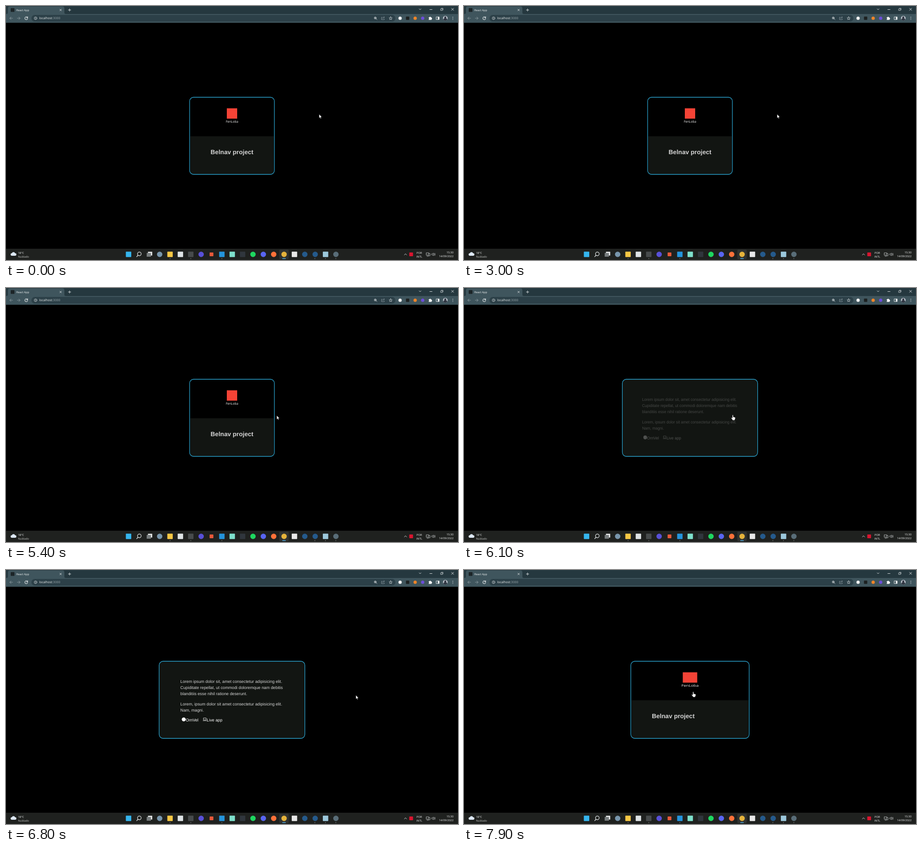
Animation, 960 px wide and 540 px high, one loop 8000 ms. Source, as an HTML page:

```html
<!DOCTYPE html>
<html lang="en">
<head>
<meta charset="utf-8">
<title>Expanding card</title>
<style>
  html, body { margin: 0; width: 100%; height: 100%; overflow: hidden; background: #000; }
  svg { display: block; width: 960px; height: 540px; }
  text { text-rendering: geometricPrecision; white-space: pre; }
  .ui { font-family: "Open Sans", "Noto Sans", sans-serif; font-size: 5.8px; fill: #f0f2f2; }
  .page { font-family: "Liberation Sans", Arial, sans-serif; font-size: 8.8px; fill: #d8d8d8; }
  .line { fill: none; stroke: #e6eaeb; stroke-width: .9; stroke-linecap: round; stroke-linejoin: round; }
  .dim { stroke: #8d9ba1; }
</style>
</head>
<body>
<svg viewBox="0 0 960 540">
  <defs>
    <clipPath id="cardClip"><rect class="cardBox" y="194" height="164" rx="8.5"/></clipPath>
  </defs>
  <rect width="960" height="540"/>

  <!-- Browser -->
  <g class="ui">
    <rect width="960" height="35.5" fill="#25383f"/>
    <rect y="17" width="960" height="18.5" fill="#3f555d"/>
    <path d="M1 17Q4 17 4 14V5Q4 1 8 1H120Q124 1 124 5V14Q124 17 127 17Z" fill="#3f555d"/>
    <rect x="54" y="19" width="773" height="14" rx="7" fill="#2c4048"/>
    <rect x="10" y="4.5" width="8" height="8" rx="1" fill="#1c2427"/>
    <text x="22" y="10.7">React App</text>
    <text x="70.5" y="28.4" font-size="6.65">localhost<tspan fill="#9aa7ac">:3000</tspan></text>
    <path d="M897.8 24h1.8a1.2 1.2 0 0 1 2.4 0h1.8v1.7a1.2 1.2 0 0 1 0 2.4v1.5h-6v-1.7a1 1 0 0 0 0-2.1z" fill="#fff"/>
    <path d="M917.2 23h3v6h-3z" fill="#fff"/>
    <circle cx="933" cy="26" r="5" fill="#bfc6cf"/>
    <path d="M929 29q0-2.6 2.7-2.9a2.2 2.2 0 1 1 2.6 0Q937 26.4 937 29a5 5 0 0 1-8 0z" fill="#303642"/>
    <g class="line">
      <path d="M114.3 6.8l3.4 3.4m0-3.4l-3.4 3.4M132.3 8.5h5.4M135 5.8v5.4"/>
      <path d="M877.5 6l2 2 2-2M900 7.5h5M946.2 4.8l4.6 4.6m0-4.6l-4.6 4.6"/>
      <path d="M923.5 6h3.5v3.5h-3.5zM924.6 4.8h3.6v3.6" stroke-width=".7"/>
      <path class="dim" d="M14 26H8m2.8-2.8L8 26l2.8 2.8M24 26h6m-2.8-2.8L30 26l-2.8 2.8"/>
      <path d="M45.4 24.2a3 3 0 1 0 .6 2.3M46 22.7v2.2h-2.2" stroke-width="1.1"/>
      <circle cx="62.8" cy="26" r="2.9" stroke-width=".7"/>
      <path d="M62.8 25.7v1.7M62.8 24.4v.1" stroke-width=".8"/>
      <circle cx="784.3" cy="25.4" r="2.2" stroke-width=".8"/>
      <path d="M786 27.1l2 2M783.3 25.4h2M784.3 24.4v2" stroke-width=".7"/>
      <path class="dim" d="M799.5 24h-2v5h6v-1.6M799.8 27q.2-3 3.7-3.1m-1.3-1.6l1.8 1.6-1.8 1.6" stroke-width=".8"/>
      <path d="M817 22.8l1 2.2 2.3.2-1.8 1.6.6 2.3-2.1-1.2-2.1 1.2.6-2.3-1.8-1.6 2.3-.2z" stroke-width=".7"/>
      <rect x="914" y="23.2" width="6" height="5.6"/>
      <path d="M949 23.4v.1M949 26v.1M949 28.6v.1" stroke-width="1.3"/>
    </g>
  </g>

  <!-- Card -->
  <rect class="cardBox" y="194" height="164" rx="8.5" id="cardFill"/>
  <g id="front">
    <g clip-path="url(#cardClip)"><rect id="panel" y="277" height="80" fill="#121512"/></g>
    <g id="badge">
      <rect x="-11" y="217.5" width="22" height="22" fill="#f44336"/>
      <text class="ui" y="248.1" text-anchor="middle" style="font-size:6.6px;fill:#fff">FenLoba</text>
    </g>
    <text id="heading" class="page" y="315" style="font-size:13.2px;font-weight:bold;fill:#d4d4d4">Belnav project</text>
  </g>
  <g id="back" class="page">
    <text x="45" y="239.6">Lorem ipsum dolor sit, amet consectetur adipisicing elit.</text>
    <text x="45" y="252.6">Cupiditate repellat, ut commodi doloremque nam debitis</text>
    <text x="45" y="265.6">blanditiis esse nihil ratione deserunt.</text>
    <text x="45" y="287.6">Lorem, ipsum dolor sit amet consectetur adipisicing elit.</text>
    <text x="45" y="300.9">Nam, magni.</text>
    <g fill="#fff">
      <circle cx="52.2" cy="317.6" r="4.2"/>
      <text x="56.5" y="322">OrnVel</text>
      <path d="M94 314.7h5.8v4H94zM92.8 320.4h8.2" fill="none" stroke="#fff" stroke-width=".8"/>
      <text x="101" y="322">Live app</text>
    </g>
  </g>
  <rect class="cardBox" y="194" height="164" rx="8.5" fill="none" stroke="#2a9fc9" stroke-width="1.3"/>

  <!-- Taskbar -->
  <rect y="516" width="960" height="24" fill="#1f211f"/>
  <rect x="580.5" y="518" width="20" height="20" rx="2" fill="#303230"/>
  <g class="ui">
    <path d="M12.5 531a2.7 2.7 0 0 1 0-5.4 3.7 3.7 0 0 1 6.8-.2 2.8 2.8 0 0 1 0 5.6z" fill="#dce8f5"/>
    <text x="25.5" y="526.6">18°C</text>
    <text x="25.5" y="534.6" fill="#c4c6c4">Nublado</text>
    <g text-anchor="middle">
      <text x="877.8" y="526.6">POR</text>
      <text x="877.8" y="534.6">INTL</text>
    </g>
    <g text-anchor="end">
      <text x="950.5" y="526.4">15:30</text>
      <text x="950.5" y="534.3">14/09/2022</text>
    </g>
    <rect x="301.5" y="522.5" width="9" height="8" fill="#eceeee"/>
    <rect x="298.8" y="525" width="9" height="8" fill="#777c7d"/>
    <g class="line">
      <circle cx="283.2" cy="527" r="3.9" stroke-width="1.2"/>
      <path d="M280.3 530l-2.6 2.9" stroke-width="1.4"/>
      <path d="M846 529.3l2.5-2.5 2.5 2.5"/>
      <path d="M898.5 524.8h-6v5h4M894 532h3M897.5 526.5h3v4.5h-3z" stroke-width=".7"/>
      <path d="M904.5 526.8h1.4l2-1.8v6l-2-1.8h-1.4zM909.3 526.3q1.3 1.7 0 3.4M910.8 525.3q2 2.7 0 5.4" stroke-width=".6"/>
    </g>
  </g>
  <g id="icons"></g>

  <!-- Pointer -->
  <g id="pointer" fill="#fff" stroke="#000" stroke-width=".6" stroke-linejoin="round">
    <path id="arrow" d="M0 0V8.4L1.9 6.7 3.2 9.6 4.6 9 3.3 6.2H5.9Z"/>
    <path id="hand" d="M-1.1 6V.8a1 1 0 0 1 2 0V4l3.1.6q1.4.4 1.3 1.9-.1 2.1-1.1 3.4v1.3H-.9V10.2L-3.3 7q-.6-1.1.3-1.5.9-.2 1.9 1.2Z"/>
  </g>
</svg>
<script>
const LOOP = 8000, STEP = 100;
const OPEN_AT = 5873, CLOSE_AT = 7767, MORPH = 450, FADE = 900;
const NARROW = 180, WIDE = 309.4, MID = 480;

// time, x, y of the pointer tip
const stops = [
  [0, 665, 230], [4300, 665, 230], [5200, 575, 271], [5600, 575, 271], [5850, 571, 270],
  [6200, 571, 270], [6700, 743, 266], [7100, 743, 266], [7650, 487, 259], [LOOP, 487, 259]
];

const $ = id => document.getElementById(id);
const set = (el, attrs) => { for (const k in attrs) el.setAttribute(k, attrs[k]); };
const clamp = v => Math.min(1, Math.max(0, v));
const smooth = v => v * v * (3 - 2 * v);
const show = (el, on) => { el.style.display = on ? "" : "none"; };

// cubic-bezier(.4, 0, .1, 1)
function ease(x) {
  let lo = 0, hi = 1;
  for (let i = 0; i < 24; i++) {
    const s = (lo + hi) / 2, r = 1 - s;
    if (1.2 * s * r * r + 0.3 * s * s * r + s * s * s < x) lo = s; else hi = s;
  }
  return smooth(lo);
}

function addIcon(x, y, size, shape, fill) {
  const round = shape === "o";
  const el = document.createElementNS("http://www.w3.org/2000/svg", round ? "circle" : "rect");
  set(el, round
    ? { cx: x, cy: y, r: size / 2, fill }
    : { x: x - size / 2, y: y - size / 2, width: size, height: size, rx: 1, fill });
  $("icons").append(el);
}

function buildIcons() {
  const apps = ("s#35b5ee - - o#7896ac s#f8c744 s#dfe4e6 s#474b4c o#5850d8 s#e8593a s#2494dc s#7ee0cc " +
    "s#30363d o#1ed760 o#5865f2 o#ff7139 o#e5b33b s#e9e9e9 o#255a8c o#255a8c s#9cc8dc o#596d78").split(" ");
  apps.forEach((app, i) => {
    if (app !== "-") addIcon(260.3 + i * 22.02, 528, i === 8 ? 8 : 11.5, app[0], app.slice(1));
  });
  for (const x of [348.5, 392.5, 458.5, 656, 678.5, 700.5]) addIcon(x, 537, 1.6, "o", "#9a9d9b");
  for (let x = 587.5; x <= 593.5; x++) addIcon(x, 537, 1.6, "o", "#58b7ee");
  addIcon(860.5, 528, 8, "s", "#d8152f");
  ["o#f4f4f4", "s#1c2020", "o#ee8428", "o#6c4ed9"].forEach((e, i) =>
    addIcon(837 + 16 * i, 26, 7, e[0], e.slice(1)));
}

function pointerAt(t) {
  const i = stops.findIndex(s => s[0] > t);
  const [t0, x0, y0] = stops[i - 1], [t1, x1, y1] = stops[i];
  const p = smooth((t - t0) / (t1 - t0));
  return [x0 + (x1 - x0) * p, y0 + (y1 - y0) * p];
}

const boxes = document.querySelectorAll(".cardBox");

function draw(t) {
  const grow = ease(clamp((t - OPEN_AT) / MORPH)) - ease(clamp((t - CLOSE_AT) / MORPH));
  const opened = t >= OPEN_AT && t < CLOSE_AT;
  const width = NARROW + (WIDE - NARROW) * grow;
  const left = MID - width / 2;

  boxes.forEach(b => set(b, { x: left, width }));
  set($("cardFill"), { fill: opened ? "#121512" : "#000" });
  show($("front"), !opened);
  show($("back"), opened);
  set($("panel"), { x: left + 1.6, width: width - 3.2 });
  set($("badge"), { transform: `translate(${MID} 0) scale(${width / NARROW} 1)` });
  set($("heading"), { x: left + 44.6 });
  set($("back"), {
    transform: `translate(${left} 0) scale(${width / WIDE} 1)`,
    opacity: clamp((t - OPEN_AT) / FADE)
  });

  const [x, y] = pointerAt(t);
  const over = x > left && x < left + width && y > 194 && y < 358;
  set($("pointer"), { transform: `translate(${x} ${y})` });
  show($("arrow"), !over);
  show($("hand"), over);
}

buildIcons();
const start = performance.now();
function tick() {
  const t = (performance.now() - start) % LOOP;
  draw(Math.floor(t / STEP) * STEP);
  requestAnimationFrame(tick);
}
tick();
</script>
</body>
</html>
```
